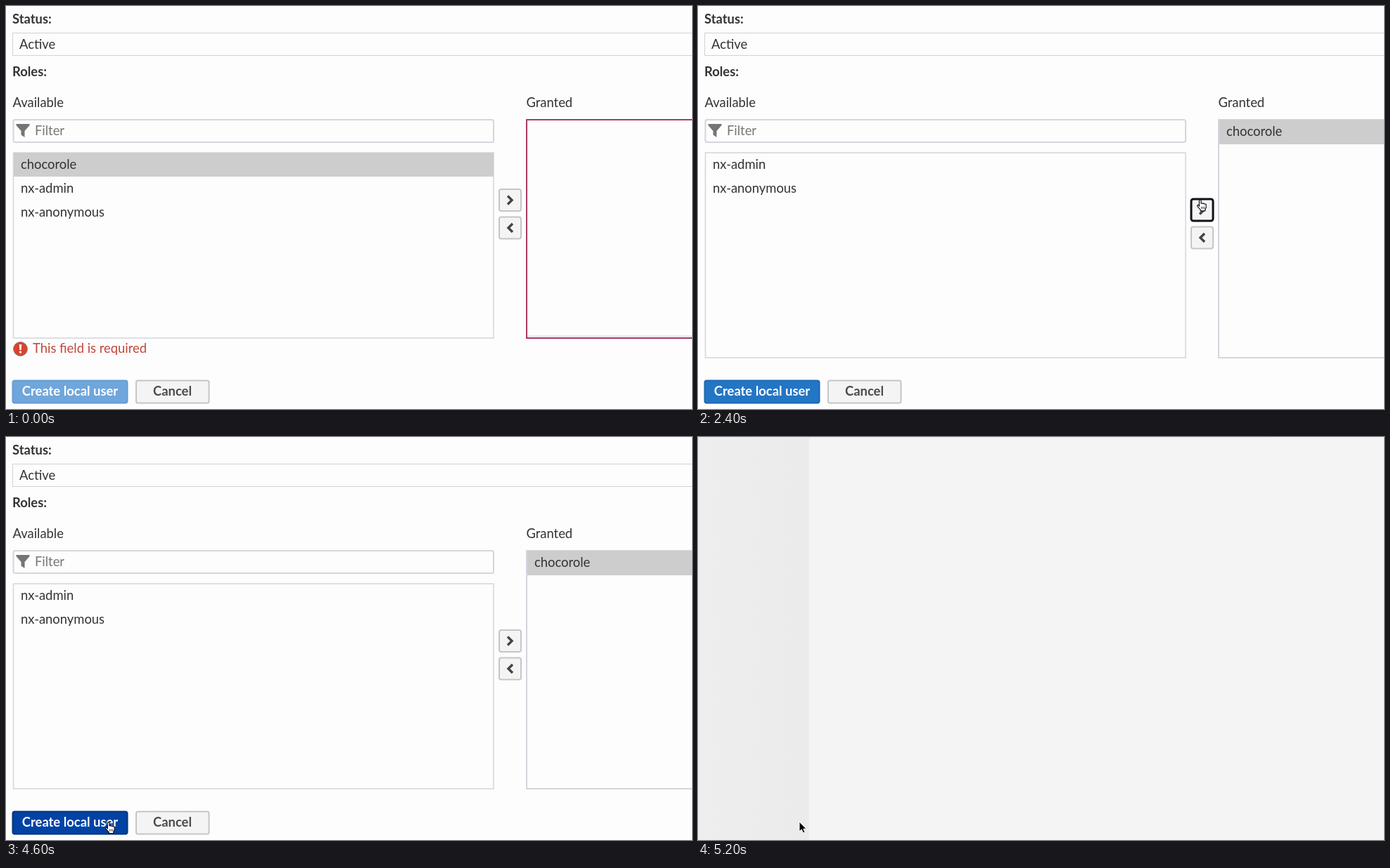
Recreate the animation shown at these times as an HTML page. Size 975 by 574 pixels, loop 5400 ms.

```html
<!DOCTYPE html>
<html lang="en">
<head>
<meta charset="utf-8">
<title>Role assignment</title>
<style>
  html, body { margin: 0; width: 100%; height: 100%; overflow: hidden; background: #fdfdfd; }
  svg { display: block; width: 975px; height: 574px; }
  text { font: 18.4px Lato, "Open Sans", sans-serif; fill: #333; }
  .bold { font-weight: 700; }
  .hint { fill: #777; }
  .error { fill: #c0463a; }
  .box { fill: #fdfdfd; stroke: #d3d6dd; stroke-width: 2; }
  .button { fill: #f4f4f4; stroke: #c6c6c8; stroke-width: 2; }
  .chevron { fill: none; stroke: #444; stroke-width: 3.4; }
</style>
</head>
<body>
<svg viewBox="0 0 975 574">
  <rect width="975" height="574" fill="#fdfdfd"/>
  <g id="form">
    <text class="bold" x="9" y="25">Status:</text>
    <rect id="status" x="9.5" y="38.5" width="990" height="32" fill="#fdfdfd"/>
    <text x="19" y="61">Active</text>
    <text class="bold" x="9" y="100">Roles:</text>
    <text x="9.5" y="144">Available</text>
    <text x="739.5" y="144">Granted</text>

    <rect class="box" x="10.5" y="162" width="682.5" height="32" rx="2.5"/>
    <path d="M14.5 168H33.5V170L26.5 178V187L21.5 183.5V178L14.5 170Z" fill="#757575"/>
    <text class="hint" x="41" y="184">Filter</text>

    <rect id="available" class="box" x="10.5" y="209" width="682.5" height="264" style="stroke-width:1.5"/>
    <rect id="row" x="11" y="209" width="682" height="34"/>
    <g id="roles"></g>

    <rect id="granted" class="box" x="740" y="162" width="260" height="311"/>
    <path id="underline" d="M741 470.5H975" stroke="#e3dfe6" stroke-width="2"/>
    <g id="chosen">
      <rect x="741" y="162" width="234" height="35" fill="#cdcdcd"/>
      <text x="751" y="185">chocorole</text>
    </g>

    <g id="arrows">
      <rect id="add" class="button" x="701" y="261" width="31" height="31" rx="3"/>
      <path class="chevron" d="M713 270.5L719 276.5L713 282.5"/>
      <rect class="button" x="701" y="300.5" width="31" height="31" rx="3"/>
      <path class="chevron" d="M720 310L714 316L720 322"/>
    </g>

    <g id="error">
      <circle cx="20.5" cy="488.5" r="10" fill="#d4452f" stroke="#9d8580"/>
      <path d="M18.7 482H22.3L21.6 490H19.4Z" fill="#fff"/>
      <circle cx="20.5" cy="493" r="1.7" fill="#fff"/>
      <text class="error" x="38" y="494">This field is required</text>
    </g>

    <rect id="create" x="9.5" y="533.5" width="163" height="32" rx="3" stroke-width="2"/>
    <text class="bold" x="91" y="555" text-anchor="middle" style="fill:#fff">Create local user</text>
    <rect class="button" x="185" y="533.5" width="103.5" height="32" rx="2.5"/>
    <text class="bold" x="236.5" y="555" text-anchor="middle" style="fill:#4a4a4a">Cancel</text>

    <g id="tip">
      <rect x="739" y="305" width="145" height="38.5" rx="3" fill="#fffcef" stroke="#e9c94f"
        stroke-width="2" style="filter:drop-shadow(2px 3px 3px #0005)"/>
      <text x="746" y="329" style="fill:#151515">Add to Selected</text>
    </g>
    <rect id="mask" width="975" height="574" fill="#000" opacity=".3"/>
    <rect id="ring" x="9" y="533" width="164" height="33" rx="3" fill="none" stroke="#7fa5d4"/>
  </g>

  <g id="next">
    <rect width="975" height="574" fill="#f4f4f4"/>
    <rect width="158" height="574" fill="url(#side)"/>
    <rect width="810" height="1" fill="#ececec"/>
  </g>
  <linearGradient id="side"><stop stop-color="#eeeeee"/><stop offset="1" stop-color="#ebebeb"/></linearGradient>

  <path id="pointer" d="M0 0V14L3.2 11L5.5 16L8 15L5.8 10.2H10Z" fill="#000" stroke="#fff" stroke-width="1"/>
  <g id="hand" fill="#fff" stroke="#111" stroke-width="1.2" stroke-linejoin="round">
    <path d="M3.4 10V2Q3.4.6 4.7.6T6 2V6Q7.4 4.7 8.5 6.3Q9.9 5.2 11 6.8Q13.2 6.2 13.2 8.5V11.5L11.8 14V16.5H5.2V15L1.2 10.5Q-.2 8.6 1.2 8.2T3.4 10Z"/>
    <path d="M6.5 10.5V13.5M8.5 10.5V13.5M10.5 10.5V13.5" stroke-width=".8"/>
  </g>
</svg>
<script>
const STEP = 200, LOOP = 5400;
const $ = id => document.getElementById(id);
const show = (id, on) => { $(id).style.display = on ? "" : "none"; };
const paint = (id, styles) => Object.assign($(id).style, styles);

// Cursor path: step, x, y
const path = [
  [1, 330, 536], [3, 430, 390], [4, 500, 232], [7, 607, 239], [8, 650, 240],
  [9, 702, 274], [10, 709, 274], [13, 709, 276], [14, 640, 312], [16, 268, 458],
  [17, 185, 512], [18, 143, 546], [22, 141, 548], [23, 141, 548], [24, 149, 552],
  [25, 149, 552], [26, 144, 548]
];

// Create button: first step, fill, border
const looks = [
  [0, "#6fa6db", "#689dd0"], [12, "#2375c5", "#1f68af"],
  [18, "#1c5fa9", "#18528f"], [22, "#0043a5", "#073477"]
];

function cursorAt(step) {
  const i = path.findIndex(p => p[0] >= step);
  const b = path[i], a = path[Math.max(0, i - 1)];
  const k = b[0] === a[0] ? 1 : (step - a[0]) / (b[0] - a[0]);
  return [a[1] + (b[1] - a[1]) * k, a[2] + (b[2] - a[2]) * k];
}

const names = ["chocorole", "nx-admin", "nx-anonymous"];
$("roles").innerHTML = names.map((name, i) =>
  `<text x="21" y="${232 + i * 34}">${name}</text>`).join("");

function draw(step) {
  const moved = step >= 12, done = step >= 26;
  const hand = (step >= 4 && step <= 8) || (step >= 10 && step <= 13) || (step >= 18 && step <= 25);
  const height = moved ? 292 : 264;

  paint("status", { stroke: step > 0 && !moved ? "#a9c8e6" : "#d2d2d4" });
  $("available").setAttribute("height", height);
  show("row", !moved);
  paint("row", { fill: step >= 4 && step <= 8 ? "#dddddd" : "#cdcdcd" });
  $("roles").setAttribute("transform", `translate(0 ${moved ? -34 : 0})`);
  show("roles", true);
  $("roles").firstChild.style.display = moved ? "none" : "";

  $("granted").setAttribute("height", height + 47);
  paint("granted", { stroke: moved ? "#d3d6dd" : "#a83b66" });
  show("underline", !moved);
  show("chosen", moved);
  show("error", !moved);

  const focused = moved && step < 22;
  $("arrows").setAttribute("transform", `translate(0 ${moved ? 14 : 0})`);
  paint("add", { stroke: focused ? "#111118" : "#c6c6c8", strokeWidth: focused ? 3 : 2 });
  show("tip", step >= 13 && step <= 17);

  const [, fill, stroke] = looks.filter(l => l[0] <= step).pop();
  paint("create", { fill, stroke });
  show("mask", step >= 24);
  show("ring", step >= 24);
  show("form", !done);
  show("next", done);

  const [x, y] = cursorAt(Math.max(1, step));
  show("pointer", step > 0 && !hand);
  show("hand", hand);
  $(hand ? "hand" : "pointer").setAttribute("transform", `translate(${x} ${y})`);
}

const start = performance.now();
let last = -1;
function tick() {
  const step = Math.floor(((performance.now() - start) % LOOP) / STEP);
  if (step !== last) draw(last = step);
  requestAnimationFrame(tick);
}
tick();
</script>
</body>
</html>
```
